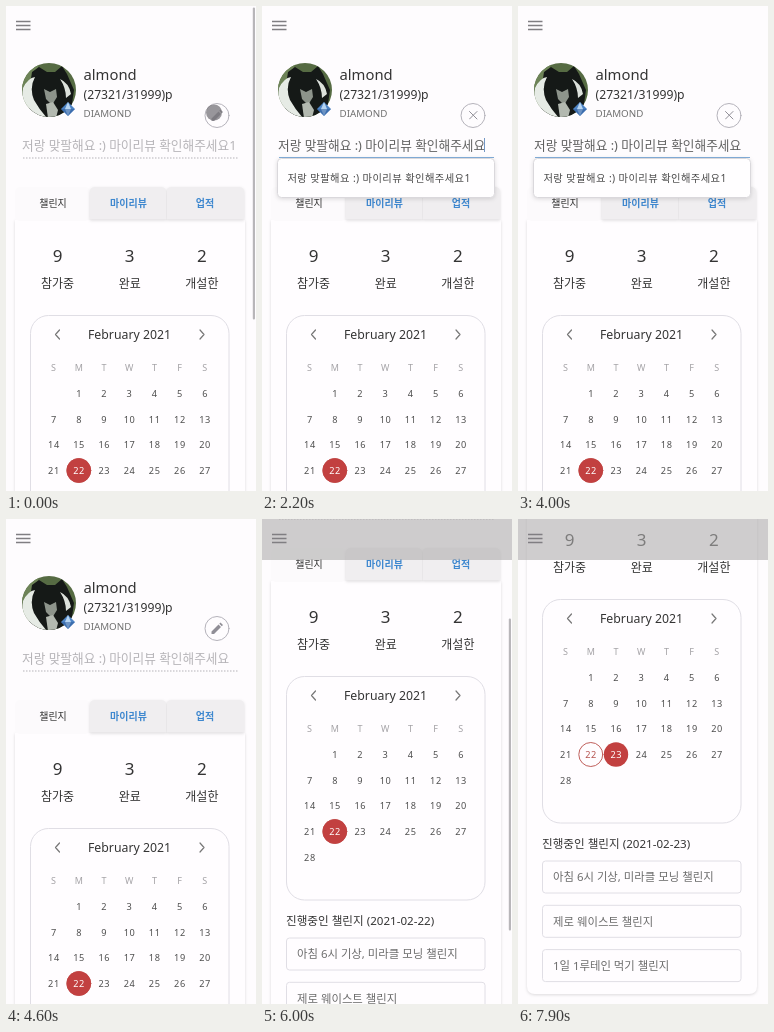
These frames come from a looping animation (250x485 px, 8000 ms). An HTML page:

```html
<!DOCTYPE html>
<html lang="ko">
<head>
<meta charset="utf-8">
<title>Profile</title>
<style>
html, body { margin: 0; width: 100%; height: 100%; overflow: hidden; background: #fefcfe; }
svg { display: block; width: 100%; height: 100%; font-family: "Noto Sans", "Noto Sans CJK KR", "Noto Sans CJK", sans-serif; fill: #343434; }
.mid { text-anchor: middle; }
.line { fill: none; stroke: #777; stroke-linecap: round; stroke-linejoin: round; }
.card { fill: none; stroke: #e0dee5; }
.soft { filter: drop-shadow(0 1px 1.5px #0002); }
.tab { font-size: 10px; font-weight: 600; fill: #3f88cf; }
.count { font-size: 17px; }
.label { font-size: 12px; font-weight: 500; }
.day { font-size: 9.2px; letter-spacing: .6px; }
.week { font-size: 9px; fill: #a3a1a5; }
.item { font-size: 11.4px; fill: #6c6c6c; }

/* One 8 s timeline: 1% = 80 ms */
.anim { animation: 8s linear infinite; }
.cut { animation: 8s step-end infinite; }
.page { animation-name: scroll; }
.thumb { animation-name: thumb; }
.bar { animation-name: bar; }
.header { animation-name: header; }
.ripple { animation-name: ripple; }
.bio { animation-name: bio; }
.last { animation-name: last; }
.view { animation-name: view; }
.edit { animation-name: edit; }
.focus { animation-name: focus; transform-origin: 124px 151px; }
.caret { animation-name: caret; }
.popup { animation-name: popup; }
.picked { animation-name: picked; }
.unpicked { animation-name: unpicked; }
.old { animation-name: old; }
.new { animation-name: new; }

@keyframes scroll {
  0%, 66.6% { transform: translateY(0); animation-timing-function: cubic-bezier(.4, 0, .4, 1); }
  75% { transform: translateY(-152px); }
  76.25%, 78% { transform: translateY(-153px); animation-timing-function: cubic-bezier(.4, 0, .4, 1); }
  83.75%, 100% { transform: translateY(-229px); }
}
@keyframes thumb {
  0%, 66.6% { transform: translateY(0); animation-timing-function: cubic-bezier(.4, 0, .4, 1); }
  75% { transform: translateY(98px); }
  76.25%, 78% { transform: translateY(98.7px); animation-timing-function: cubic-bezier(.4, 0, .4, 1); }
  83.75%, 100% { transform: translateY(148px); }
}
@keyframes bar {
  0%, 3.5% { opacity: 1; }
  8%, 58% { opacity: 0; }
  61%, 87% { opacity: 1; }
  90%, 100% { opacity: 0; }
}
@keyframes header { 0%, 67% { opacity: 0; } 71%, 100% { opacity: 1; } }
@keyframes ripple {
  0%, 2% { opacity: .75; }
  7%, 51% { opacity: 0; }
  52.5% { opacity: .35; }
  57%, 100% { opacity: 0; }
}
@keyframes bio { 0% { fill: #b6b4b8; } 3% { fill: #606060; } 54% { fill: #b6b4b8; } }
@keyframes last { 0% { opacity: 1; } 26.25% { opacity: 0; } }
@keyframes view { 0% { opacity: 1; } 3% { opacity: 0; } 54% { opacity: 1; } }
@keyframes edit { 0% { opacity: 0; } 3% { opacity: 1; } 54% { opacity: 0; } }
@keyframes focus {
  0%, 16.25% { transform: scaleX(0); opacity: 1; }
  18.75%, 51.5% { transform: scaleX(1); opacity: 1; }
  54%, 100% { transform: scaleX(1); opacity: 0; }
}
@keyframes caret {
  0% { opacity: 0; transform: translateX(7px); }
  16.25% { opacity: 1; transform: translateX(7px); }
  22.5% { opacity: 0; }
  26.25% { opacity: 1; transform: none; }
  32.5% { opacity: 0; }
  37.5% { opacity: 1; }
  42.5% { opacity: 0; }
}
@keyframes popup { 0% { opacity: 0; } 26.25% { opacity: 1; } 51.25% { opacity: 0; } }
@keyframes picked { 0%, 94% { opacity: 0; } 97.5%, 100% { opacity: 1; } }
@keyframes unpicked { 0%, 94% { opacity: 1; } 97.5%, 100% { opacity: 0; } }
@keyframes old { 0% { opacity: 1; } 94.9% { opacity: 0; } }
@keyframes new { 0% { opacity: 0; } 94.9% { opacity: 1; } }
</style>
</head>
<body>
<svg viewBox="0 0 250 485" preserveAspectRatio="none">
  <defs><clipPath id="round"><circle cx="43" cy="84" r="27"/></clipPath></defs>
  <rect width="250" height="485" fill="#fefcfe"/>

  <g class="anim page">
    <g clip-path="url(#round)">
      <rect x="16" y="57" width="54" height="54" fill="#566b43"/>
      <path d="M16 57H34L24 76 16 82Z" fill="#6d8357"/>
      <path d="M26 66L33 61 41 66H49L56 60 61 68 68 84 64 112H24L22 92Z" fill="#151917"/>
      <path d="M17 82Q22 72 29 71Q23 82 28 94Q33 103 41 112H24Q14 100 17 82Z" fill="#e6ebe5"/>
      <path d="M54 73Q63 77 65 88L60 92Q60 82 54 73Z" fill="#dde2dc"/>
      <path d="M38 83L44 86 50 83 51 91 46 99 40 93Z" fill="#8d948b"/>
      <path d="M40 98L47 96 52 104 50 112H42Z" fill="#b3b9b0"/>
    </g>
    <path d="M62 96L69 103 62 110 55 103Z" fill="#4d83c4"/>
    <path d="M62 96L65 103 62 110 59 103Z" fill="#b6d5f2"/>
    <path d="M55 103H69L62 110Z" fill="#2f5d9d" opacity=".55"/>

    <text x="77.5" y="74" font-size="14.8">almond</text>
    <text x="77.5" y="92.5" font-size="12.2">(27321/31999)p</text>
    <text x="77.5" y="110.6" font-size="9.8" fill="#707070">DIAMOND</text>

    <circle class="line" cx="211" cy="109.5" r="12" style="stroke:#b4b2ba"/>
    <path class="cut view" d="M205.5 115V112.5L212.5 105.5 215 108 208 115ZM213.3 104.7L214.5 103.5 217 106 215.8 107.2Z" fill="#908e96"/>
    <circle class="anim ripple" cx="208" cy="106.5" r="8" fill="#77757a"/>
    <path class="line cut edit" d="M207.5 105.5L215 113M215 105.5L207.5 113" style="stroke:#908e96"/>

    <text class="cut bio" x="16" y="143.7" font-size="12.7">저랑 맞팔해요 :) 마이리뷰 확인해주세요<tspan class="cut last">1</tspan></text>
    <path class="cut view" d="M17 152H232" stroke="#b5b3b8" stroke-dasharray="1.5 1.5"/>
    <path class="cut edit" d="M17 151.5H232" stroke="#a5a3a8"/>
    <path class="anim focus" d="M17 151.5H232" stroke="#7fa9d4"/>
    <rect class="cut caret" x="222" y="132" width="1" height="14" fill="#7397c4"/>

    <path class="soft" d="M9 214H239V696Q239 704 231 704H17Q9 704 9 696Z" fill="#fffdff"/>
    <rect x="9" y="181" width="75" height="34" rx="5" fill="#fcfafc"/>
    <g class="soft" fill="#f0eef0">
      <path d="M84 213.5V186Q84 181 89 181H155Q160 181 160 186V213.5Z"/>
      <path d="M160.5 213.5V186Q160.5 181 166 181H233Q238 181 238 186V213.5Z"/>
    </g>
    <g class="mid">
      <text x="47" y="200.7" font-size="10" font-weight="500">챌린지</text>
      <text class="tab" x="122.5" y="200.7">마이리뷰</text>
      <text class="tab" x="199" y="200.7">업적</text>
    </g>
    <g id="counts" class="mid"></g>

    <rect class="card" x="24.5" y="309.5" width="198.5" height="223.5" rx="18"/>
    <path class="line" d="M53.5 324L49.5 328.5 53.5 333M194 324L198 328.5 194 333" stroke-width="1.2"/>
    <text class="mid" x="123.5" y="333" font-size="12.3">February 2021</text>
    <circle class="line" cx="72.8" cy="464.5" r="12" style="stroke:#c0605c"/>
    <circle class="anim unpicked" cx="72.8" cy="464.5" r="12.2" fill="#c24040"/>
    <circle class="anim picked" cx="98" cy="464.5" r="12.2" fill="#c24040"/>
    <g id="days" class="mid"></g>

    <g font-size="11.6" font-weight="500">
      <text class="cut old" x="24" y="557.8">진행중인 챌린지 (2021-02-22)</text>
      <text class="cut new" x="24" y="557.8">진행중인 챌린지 (2021-02-23)</text>
    </g>
    <g id="items"></g>

    <g class="cut popup">
      <rect x="15.5" y="152.5" width="217" height="39" rx="4" fill="#fffeff" stroke="#dad8dc" style="filter:drop-shadow(0 1.5px 2px #0002)"/>
      <path d="M17 151.5H232" stroke="#7fa9d4"/>
      <text x="25.5" y="175.6" font-size="10.3" letter-spacing=".4" fill="#4a4a4a">저랑 맞팔해요 :) 마이리뷰 확인해주세요1</text>
    </g>
  </g>

  <rect class="anim header" width="250" height="41" fill="#afadae" fill-opacity=".6"/>
  <path d="M10 15.5H24.5M10 19.5H24.5M10 23.5H24.5" stroke="#807e82" stroke-width="1.3"/>
  <g class="anim bar"><rect class="anim thumb" x="246.8" y="1.5" width="2.2" height="312" rx="1.1" fill="#b8b6b9"/></g>
</svg>
<script>
const add = (id, tag, attrs, content = '') => {
  const el = document.createElementNS('http://www.w3.org/2000/svg', tag);
  for (const key in attrs) el.setAttribute(key, attrs[key]);
  el.textContent = content;
  document.getElementById(id).append(el);
};
const columnX = column => 47.6 + column * 25.2;

[['9', '참가중'], ['3', '완료'], ['2', '개설한']].forEach(([count, label], i) => {
  const x = 51.5 + i * 72.2;
  add('counts', 'text', { class: 'count', x, y: 256 }, count);
  add('counts', 'text', { class: 'label', x, y: 282.2 }, label);
});

[...'SMTWTFS'].forEach((name, i) =>
  add('days', 'text', { class: 'week', x: columnX(i), y: 364.7 }, name));

for (let day = 1; day <= 28; day++) {
  const place = { x: columnX(day % 7) + .3, y: 391 + Math.floor(day / 7) * 25.7 };
  const draw = (state, fill) =>
    add('days', 'text', { ...place, class: 'day ' + state, fill }, day);
  if (day === 22) {
    draw('anim unpicked', '#fff');
    draw('anim picked', '#b5524e');
  } else if (day === 23) {
    draw('anim unpicked', '#4e4e4e');
    draw('anim picked', '#fff');
  } else draw('', '#4e4e4e');
}

['아침 6시 기상, 미라클 모닝 챌린지', '제로 웨이스트 챌린지', '1일 1루테인 먹기 챌린지'].forEach((title, i) => {
  const y = 571 + i * 44.3;
  add('items', 'rect', { class: 'card', x: 24.5, y, width: 198.5, height: 32, rx: 3 });
  add('items', 'text', { class: 'item', x: 35, y: y + 20.2 }, title);
});
</script>
</body>
</html>
```
